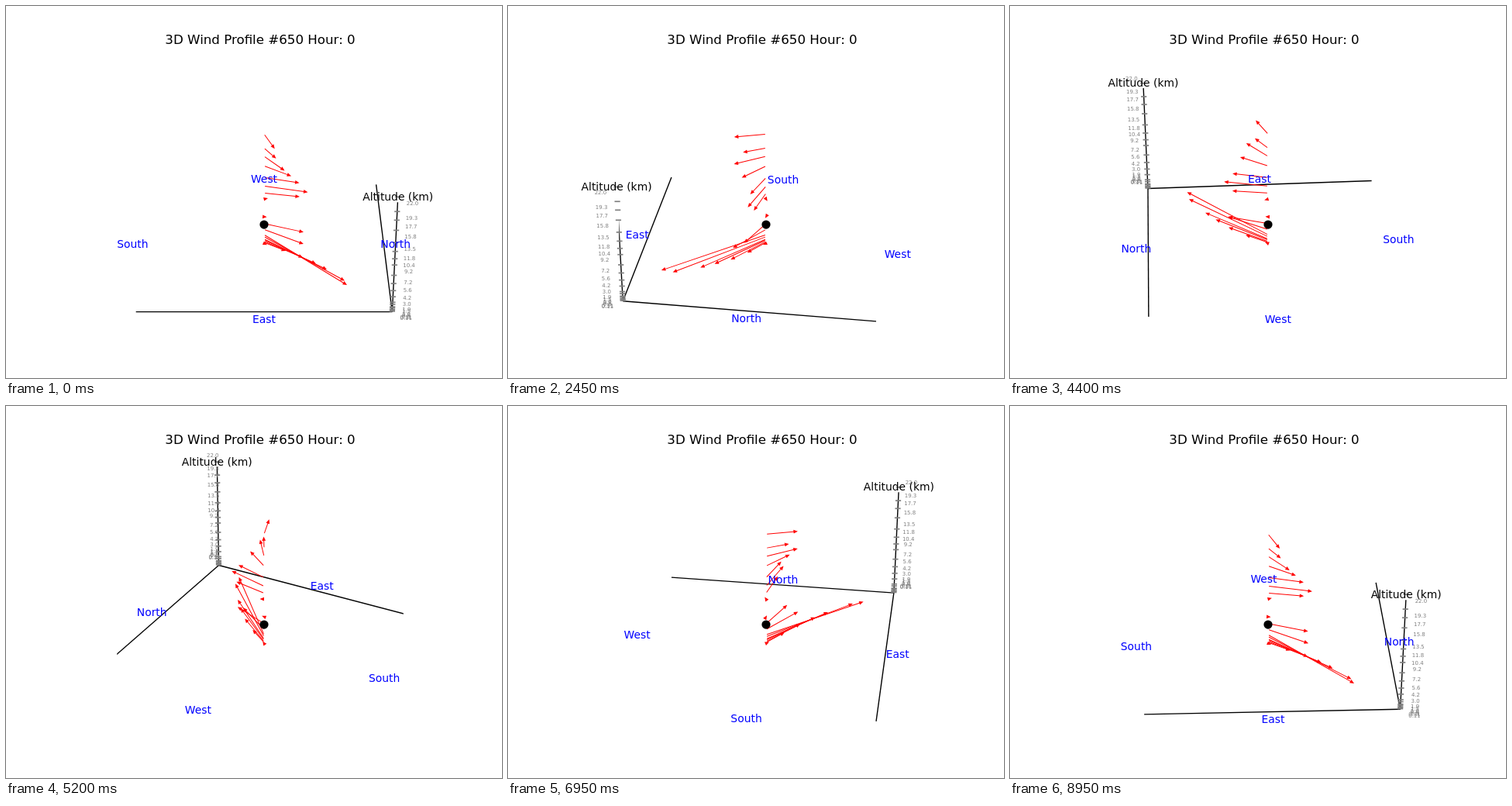
Write an HTML page with a canvas that moves like this. It is 640 px wide and 480 px high and loops after 9000 ms.

```html
<!DOCTYPE html>
<html lang="en">
<head>
<meta charset="utf-8">
<title>3D Wind Profile</title>
<style>
  html, body { margin: 0; width: 100%; height: 100%; overflow: hidden; background: #fff; }
  canvas { display: block; }
</style>
</head>
<body>
<canvas id="stage" width="640" height="480"></canvas>
<script>
const ctx = document.getElementById('stage').getContext('2d');
const STEP_MS = 50, STEPS = 180;
const DISTANCE = 10, SCALE = 1997.8, CENTER = { x: 333, y: 237.4 };
const COS_ELEV = Math.cos(Math.PI / 6), SIN_ELEV = 0.5;
const EDGE = 0.788, LABEL_EDGE = EDGE * 1.1;

// altitude (km), wind towards east, wind towards north
const winds = [
  [0.11, 0.018, 0.02], [0.31, 0.104, 0.1415], [0.5, 0.196, 0.251],
  [0.8, 0.287, 0.333], [1.0, 0.3675, 0.4], [1.5, 0.5256, 0.506],
  [1.9, 0.5966, 0.517], [3.0, 0.18, 0.2545], [4.2, 0.106, 0.256],
  [5.6, 0.003, 0.018], [7.2, 0, 0], [9.2, -0.012, 0.025],
  [10.4, 0.046, 0.2293], [11.8, 0.077, 0.2805], [13.5, 0.069, 0.2253],
  [15.8, 0.131, 0.172], [17.7, 0.187, 0.129], [19.3, 0.137, 0.0755],
  [22.0, 0.194, 0.066]
];

const compass = [
  ['East', LABEL_EDGE, 0], ['West', -LABEL_EDGE, 0],
  ['North', 0, LABEL_EDGE], ['South', 0, -LABEL_EDGE]
];

// Perspective camera circling the vertical axis
function makeCamera(azimuth) {
  const c = Math.cos(azimuth), s = Math.sin(azimuth);
  return (east, north, altitude) => {
    const z = 0.0372 * (altitude - 11.03);
    const toward = east * c + north * s;
    const k = SCALE / (DISTANCE - toward * COS_ELEV - z * SIN_ELEV);
    return {
      x: CENTER.x + (north * c - east * s) * k,
      y: CENTER.y - (z * COS_ELEV - toward * SIN_ELEV) * k
    };
  };
}

function text(string, x, baseline, size, color) {
  ctx.font = `${size}px "DejaVu Sans", sans-serif`;
  ctx.fillStyle = color;
  ctx.fillText(string, x, baseline);
}

function line(a, b, width, color) {
  ctx.lineWidth = width;
  ctx.strokeStyle = color;
  ctx.beginPath();
  ctx.moveTo(a.x, a.y);
  ctx.lineTo(b.x, b.y);
  ctx.stroke();
}

function arrow(from, to) {
  const length = Math.hypot(to.x - from.x, to.y - from.y);
  if (length < 0.1) return;
  const head = 5.5, half = 2.4, gap = 1.2;
  ctx.save();
  ctx.translate(from.x, from.y);
  ctx.rotate(Math.atan2(to.y - from.y, to.x - from.x));
  if (length > head) line({ x: gap, y: 0 }, { x: length - 3, y: 0 }, 1, '#f00');
  ctx.fillStyle = '#f00';
  ctx.beginPath();
  ctx.moveTo(length, 0);
  ctx.lineTo(length - head, -half);
  ctx.lineTo(length - head, half);
  ctx.fill();
  ctx.restore();
}

function drawAxes(project) {
  const corner = project(EDGE, EDGE, 0);
  ctx.save();
  ctx.beginPath();
  ctx.rect(143.2, 57.6, 369.6, 369.6);
  ctx.clip();
  line(corner, project(EDGE, -EDGE, 0), 1.39, '#000');
  line(corner, project(-EDGE, EDGE, 0), 1.39, '#000');
  line(corner, project(EDGE, EDGE, 21), 1.39, '#000');
  ctx.restore();
}

function drawAltitudes(project) {
  for (const [altitude] of winds) {
    const tick = project(EDGE, EDGE, altitude);
    ctx.fillStyle = '#808080';
    ctx.fillRect(tick.x - 3.6, tick.y - 0.85, 7.2, 1.7);
    const label = project(LABEL_EDGE, LABEL_EDGE, altitude);
    text(altitude.toFixed(altitude < 0.4 ? 2 : 1), label.x, label.y + 2, 6.94, '#808080');
  }
  const top = project(EDGE, EDGE, 22);
  text('Altitude (km)', top.x, top.y + 4.7, 13.89, '#000');
}

function draw(step) {
  const project = makeCamera(step / STEPS * 2 * Math.PI);
  ctx.fillStyle = '#fff';
  ctx.fillRect(0, 0, 640, 480);
  ctx.textAlign = 'center';

  drawAxes(project);
  for (const [altitude, east, north] of winds) {
    arrow(project(0, 0, altitude), project(east, north, altitude));
  }

  const dot = project(0, 0, 4);
  ctx.fillStyle = '#000';
  ctx.beginPath();
  ctx.arc(dot.x, dot.y, 5.6, 0, 2 * Math.PI);
  ctx.fill();

  drawAltitudes(project);
  for (const [name, east, north] of compass) {
    const p = project(east, north, 0);
    text(name, p.x, p.y + 5, 13.89, '#00f');
  }
  text('3D Wind Profile #650 Hour: 0', 328, 49.3, 16.67, '#000');
}

function tick() {
  draw(Math.floor(performance.now() / STEP_MS) % STEPS);
  requestAnimationFrame(tick);
}
tick();
</script>
</body>
</html>
```
